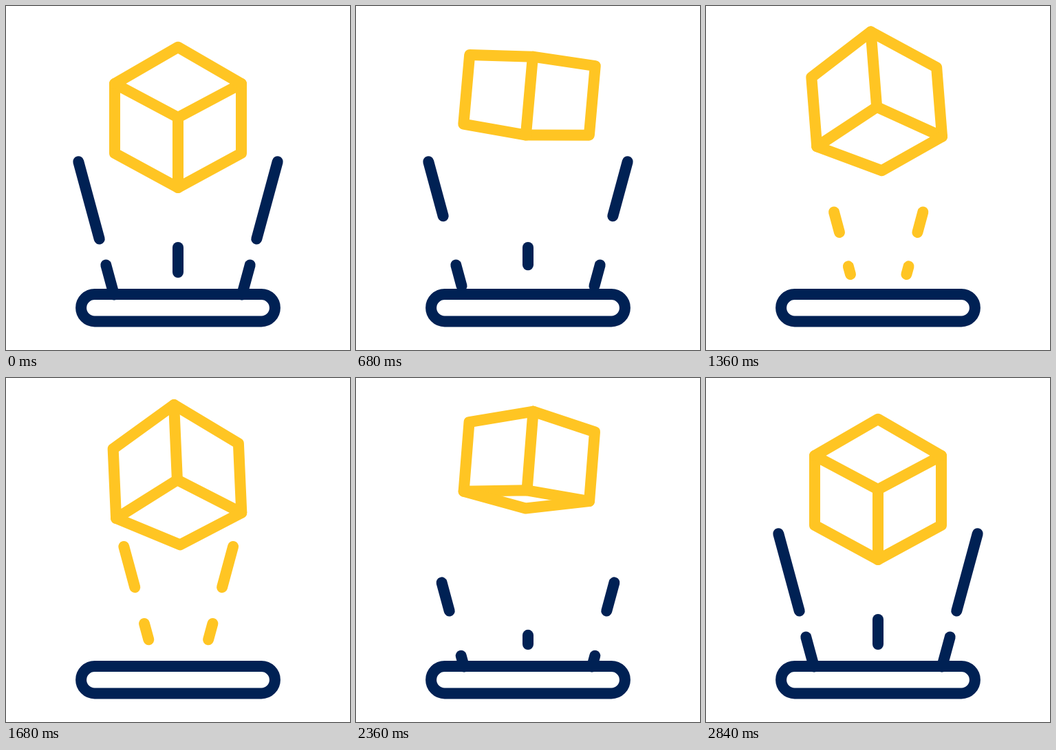
Write an HTML page with a canvas that moves like this. It is 500 px wide and 500 px high and loops after 3000 ms.

```html
<!DOCTYPE html>
<html lang="en">
<head>
<meta charset="utf-8">
<title>Floating cube</title>
<style>
  html, body { margin: 0; width: 100%; height: 100%; overflow: hidden; background: #fff; }
  canvas { display: block; width: 500px; height: 500px; }
</style>
</head>
<body>
<canvas id="stage" width="500" height="500"></canvas>
<script>
const ctx = document.getElementById('stage').getContext('2d');
const LOOP = 3000, STEP = 40;
const GOLD = '#ffc523', NAVY = '#002154';

// Left beams, each from its upper to its lower end.
const NAVY_BEAMS = [[105.3, 226.3, 135.7, 338.5], [145.3, 376.5, 157, 419.5]];
const GOLD_BEAMS = [[171.3, 245, 194, 329], [201, 357, 210, 390]];
const MIDDLE_BEAM = [250, 351, 250, 387];

const mix = (a, b, u) => a + (b - a) * u;
const smooth = x => x * x * (3 - 2 * x);

function progress(t, start, end) {
  return Math.min(1, Math.max(0, (t - start) / (end - start)));
}

// 0 when the cube is seen from above, 1 when it is seen from below.
function tipping(t) {
  const out = progress(t, 80, 1380);
  const back = progress(t, 1680, 2840);
  return mix(out, smooth(out), 0.25) - back ** 1.8;
}

function poseAt(t) {
  const tip = tipping(t);
  const sway = Math.PI * progress(t, 80, 2840);
  const near = mix(49.5, -56, tip);
  const tilt = near / 50;
  return {
    y: mix(163.5, 149.5, tip) - 58 * tip ** 0.9 * (1 - tip ** 4.5),
    roll: 0.089 * Math.sin(3 * sway - 0.63 * Math.sin(2 * sway)),
    halfWidth: 92 - 0.8 * tip,
    near,
    far: -0.6 + 57.5 * tilt + 6.75 * tilt ** 2 - 10 * tilt ** 3,
    stretch: 6.7 - 2.25 * tilt - 4 * tilt ** 2
  };
}

function line(points, closed) {
  ctx.beginPath();
  points.forEach(p => ctx.lineTo(p[0], p[1]));
  if (closed) ctx.closePath();
  ctx.stroke();
}

function drawCube(t) {
  const { y, roll, halfWidth: w, near, far, stretch } = poseAt(t);
  const h = 50.5;
  const topNear = [0, near - stretch - h], lowNear = [0, near + stretch + h];
  ctx.save();
  ctx.strokeStyle = GOLD;
  ctx.translate(250 + 23 * roll, y);
  ctx.rotate(roll);
  line([[-w, -h], topNear, [w, -h], [w, h], lowNear, [-w, h]], true);
  line([topNear, lowNear]);
  if (near + far > stretch) line([[-w, -h], [0, -h - far], [w, -h]]);
  if (near + far < -stretch) line([[-w, h], [0, h - far], [w, h]]);
  ctx.restore();
}

function drawBeam([x1, y1, x2, y2], from, to) {
  const at = u => [mix(x1, x2, u), mix(y1, y2, u)];
  line([at(from), at(to)]);
}

function drawPairs(beams, axis, from, to) {
  for (const [x1, y1, x2, y2] of beams) {
    drawBeam([x1, y1, x2, y2], from, to);
    drawBeam([2 * axis - x1, y1, 2 * axis - x2, y2], from, to);
  }
}

function drawLight(t) {
  const ease = start => smooth(progress(t, start, start + 500));
  if (t < 1000 || t > 2155) {
    const from = t < 1000 ? 0 : 1 - ease(2155);
    const to = t < 1000 ? 1 - ease(500) : 1;
    ctx.strokeStyle = NAVY;
    drawPairs(NAVY_BEAMS, 250, from, to);
    drawBeam(MIDDLE_BEAM, from, to);
  }
  if (t > 1160 && t < 2000) {
    ctx.strokeStyle = GOLD;
    drawPairs(GOLD_BEAMS, 250.7, 1 - ease(1160), 1 - ease(1500));
  }
}

function drawBase() {
  ctx.strokeStyle = NAVY;
  ctx.beginPath();
  ctx.arc(128.8, 438.7, 19.7, Math.PI / 2, Math.PI * 1.5);
  ctx.arc(371.2, 438.7, 19.7, -Math.PI / 2, Math.PI / 2);
  ctx.closePath();
  ctx.stroke();
}

function draw(elapsed) {
  const t = Math.floor((elapsed % LOOP) / STEP) * STEP;
  ctx.fillStyle = '#fff';
  ctx.fillRect(0, 0, 500, 500);
  ctx.lineWidth = 16;
  ctx.lineCap = ctx.lineJoin = 'round';
  drawLight(t);
  drawBase();
  drawCube(t);
}

const start = performance.now();
function tick() {
  draw(performance.now() - start);
  requestAnimationFrame(tick);
}
tick();
</script>
</body>
</html>
```
